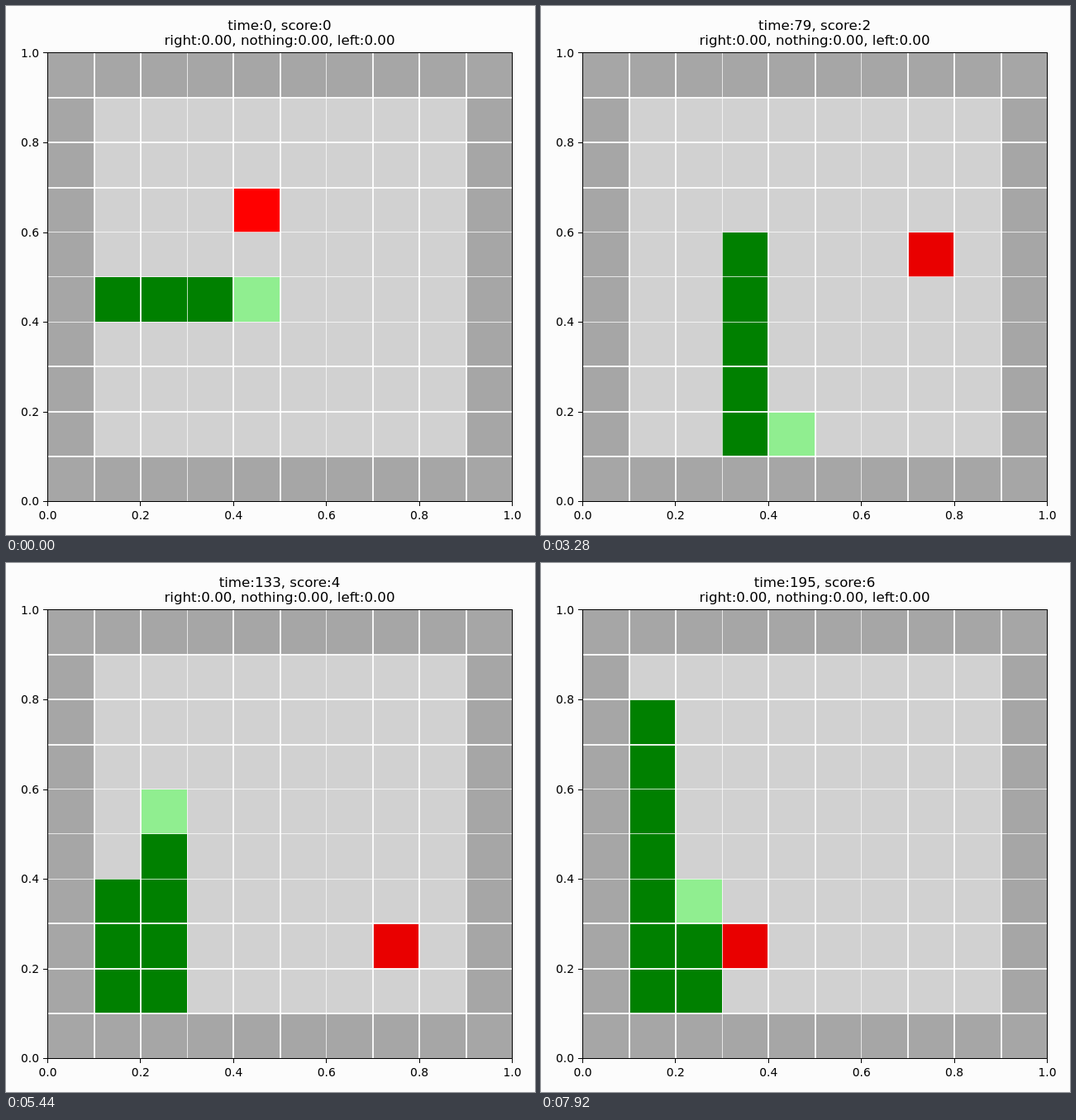
These frames come from a looping animation (640x640 px, 8000 ms). An HTML page with a canvas:

```html
<!DOCTYPE html>
<html lang="en">
<head>
<meta charset="utf-8">
<title>Snake on a grid</title>
<style>
  html, body { margin: 0; width: 100%; height: 100%; overflow: hidden; background: #fcfcfc; }
  canvas { display: block; width: 640px; height: 640px; }
</style>
</head>
<body>
<canvas id="stage" width="640" height="640"></canvas>
<script>
const ctx = document.getElementById('stage').getContext('2d');
const STEP = 80, STEPS = 100;
const LEFT = 50.5, TOP = 57, CELL_W = 56.2, CELL_H = 54.2;
const BOTTOM = TOP + 10 * CELL_H;

// Each apple: column, row, tick at which it is eaten
const apples = [
  [4, 6, 20], [2, 7, 71], [7, 5, 102], [2, 2, 130],
  [7, 2, 169], [8, 6, 176], [3, 2, Infinity]
];

// Grid lines: first pixel of the wide and the thin ones
const wideX = [106, 162, 274, 331, 443, 499, 556], thinX = [219, 387];
const wideY = [110, 164, 219, 435, 490, 544], thinY = [273, 327, 382];

// Head cell at a tick: a short lead-in, then a tour through all 64 cells
function headAt(t) {
  if (t <= 1) return [4 + t, 4];
  if (t <= 5) return [5, 3 + t];
  if (t <= 7) return [10 - t, 8];
  const k = (t + 6) % 64;
  if (k >= 56) return [64 - k, 8];
  const col = Math.floor(k / 7) + 1, r = k % 7;
  return [col, col % 2 ? 7 - r : 1 + r];
}

function rect(color, x, y, w, h) {
  ctx.fillStyle = color;
  ctx.fillRect(x, y, w, h);
}

function cell([col, row], color) {
  const x = Math.round(LEFT + col * CELL_W), y = Math.round(BOTTOM - (row + 1) * CELL_H);
  rect(color, x, y,
    Math.round(LEFT + (col + 1) * CELL_W) - x,
    Math.round(BOTTOM - row * CELL_H) - y);
}

function text(str, x, y, size, align) {
  ctx.font = size + 'px "DejaVu Sans", sans-serif';
  ctx.textAlign = align;
  ctx.fillStyle = '#000';
  ctx.fillText(str, x, y);
}

function drawLines() {
  const thin = 'rgba(255,255,255,0.72)', wide = 'rgba(255,255,255,0.9)';
  wideX.forEach(x => rect(wide, x, 57, 2, 542));
  thinX.forEach(x => rect(thin, x, 57, 1, 542));
  wideY.forEach(y => rect(wide, 51, y, 561, 2));
  thinY.forEach(y => rect(thin, 51, y, 561, 1));
}

function drawAxes() {
  ctx.strokeStyle = '#000';
  ctx.lineWidth = 1;
  ctx.strokeRect(50.5, 56.5, 562, 543);
  for (let i = 0; i <= 5; i++) {
    const label = (i / 5).toFixed(1);
    const x = LEFT + i * 2 * CELL_W, y = BOTTOM - i * 2 * CELL_H;
    rect('#000', Math.floor(x), 600, 1, 5);
    rect('#000', 45, Math.round(y) - (i === 5 ? 1 : 0), 5, 1);
    text(label, x, 620.5, 13.89, 'center');
    text(label, 40, y + 5, 13.89, 'right');
  }
}

function draw(step) {
  const tick = Math.max(0, 2 * step - 3);
  const score = apples.filter(a => a[2] <= tick).length;

  rect('#fcfcfc', 0, 0, 640, 640);
  rect('#a6a6a6', 51, 57, 561, 542);
  rect('#d1d1d1', 107, 111, 450, 434);

  cell(apples[score], step ? '#e90000' : '#ff0000');
  for (let i = 3 + score; i >= 0; i--) {
    cell(headAt(tick - i), i ? '#008000' : '#90ee90');
  }
  drawLines();
  drawAxes();

  text(`time:${tick}, score:${score}`, 331, 28.5, 16.67, 'center');
  text('right:0.00, nothing:0.00, left:0.00', 331, 46.5, 16.67, 'center');
}

const start = performance.now();
function loop() {
  draw(Math.floor((performance.now() - start) / STEP) % STEPS);
  requestAnimationFrame(loop);
}
loop();
</script>
</body>
</html>
```
